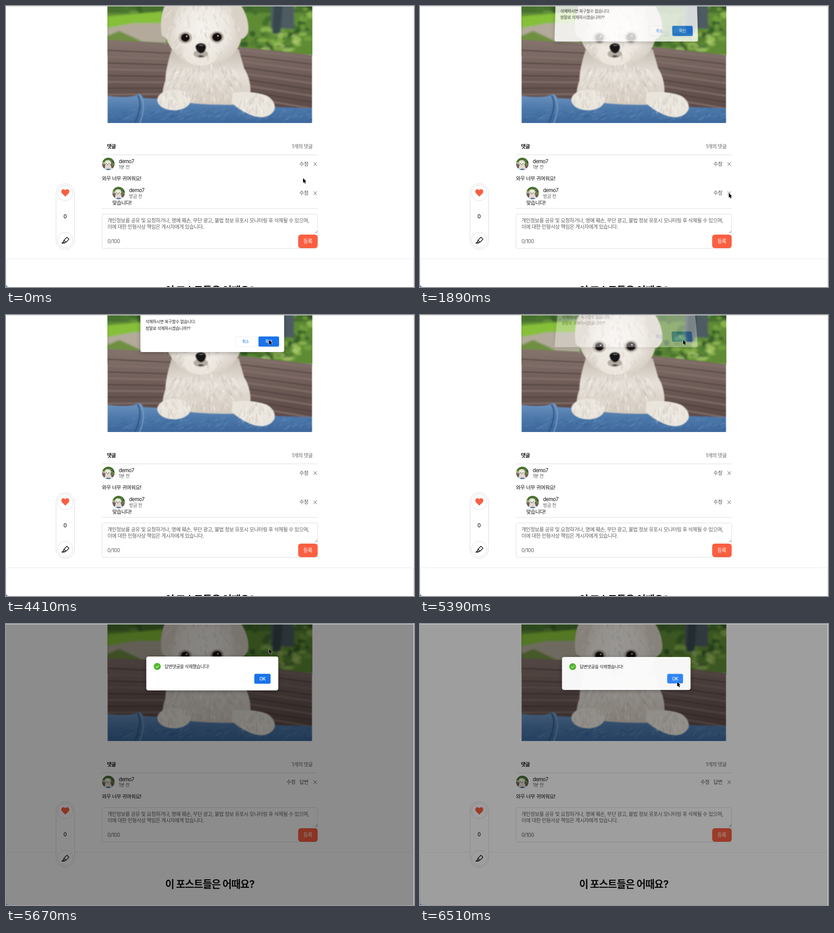
These frames come from a looping animation (901 px wide and 622 px high, 6.58 s). An HTML page:

```html
<!DOCTYPE html>
<html lang="ko">
<head>
<meta charset="utf-8">
<title>댓글 삭제</title>
<style>
  html, body { margin: 0; width: 100%; height: 100%; overflow: hidden; background: #fff; }
  #stage { position: absolute; inset: 0; overflow: hidden; contain: strict; }
  svg { position: absolute; left: 0; top: 0; width: 901px; height: 622px; }
  text { font-family: Inter, "Noto Sans CJK KR", "Noto Sans CJK", sans-serif; letter-spacing: -.04em; white-space: pre; }
  #confirm { height: 100px; transform-origin: 455.5px 82px; overflow: visible; }
  #confirmBox, #alert { filter: drop-shadow(0 2px 5px rgba(0, 0, 0, .3)); }
</style>
</head>
<body>
<div id="stage">
<svg id="page" viewBox="0 0 901 622"></svg>
<svg id="confirm" viewBox="0 0 901 100"></svg>
<svg id="top" viewBox="0 0 901 622"></svg>
</div>
<script>
const LOOP = 6580;
const ORANGE = '#fa5f42', BLUE = '#1a73e8', LINE = '#dcdcdc';
const NAME = 'demo7';
const $ = id => document.getElementById(id);

let seed = 11;
const rnd = () => (seed = (seed * 16807) % 2147483647) / 2147483647;
const span = (a, b) => +(a + (b - a) * rnd()).toFixed(1);
const repeat = (n, fn) => Array.from({ length: n }, (_, i) => fn(i)).join('');

const text = (x, y, size, fill, str, extra = '') =>
  `<text x="${x}" y="${y}" font-size="${size}" fill="${fill}" ${extra}>${str}</text>`;
const rect = (x, y, w, h, r, fill, extra = '') =>
  `<rect x="${x}" y="${y}" width="${w}" height="${h}" rx="${r}" fill="${fill}" ${extra}/>`;
const oval = (x, y, rx, ry, fill, extra = '') =>
  `<ellipse cx="${x}" cy="${y}" rx="${rx}" ry="${ry}" fill="${fill}" ${extra}/>`;
const path = (d, fill, extra = '') => `<path d="${d}" fill="${fill}" ${extra}/>`;
const stroke = (color, w = 1) => `stroke="${color}" stroke-width="${w}"`;
const blurred = (id, content) => `<g filter="url(#${id})">${content}</g>`;
const BOLD = 'font-weight="700"', MEDIUM = 'font-weight="500"', MID = 'text-anchor="middle"';

function leaves(n, x0, x1, y0, y1, colors) {
  return repeat(n, i => oval(span(x0, x1), span(y0, y1), span(5, 13), span(3, 8), colors[i % colors.length], 'opacity=".7"'));
}

function fur(n, cx, cy, rx, ry) {
  return repeat(n, i => {
    const a = span(0, 6.283), r = Math.sqrt(rnd());
    const x = cx + Math.cos(a) * r * rx, y = cy + Math.sin(a) * r * ry;
    const dx = (x - cx) * .06 + span(-2, 2);
    return path(`M${x.toFixed(1)} ${y.toFixed(1)}q${dx.toFixed(1)} 4 ${(dx * 1.6).toFixed(1)} ${span(7, 12)}`,
      'none', stroke(i % 2 ? '#fffdf9' : '#bdb4a9', 1.5) + ' opacity=".5"');
  });
}

function photo() {
  const scenery =
    rect(200, -130, 500, 240, 0, '#5f8b36') +
    rect(200, -130, 500, 145, 0, '#47702d') +
    leaves(50, 224, 350, -110, 18, ['#2f5726', '#6f9d42', '#4c7a30']) +
    path('M224 23 L345 12 V40 L224 50Z', '#86c038') +
    path('M224 49 L282 38 H352 V82 L224 76Z', '#b3aa9b') +
    path('M224 66 L250 55 L300 78 L224 84Z', '#6f8f42') +
    leaves(100, 515, 676, -110, 98, ['#284d25', '#79a93f', '#3a652a', '#9dc45a']) +
    rect(585, -120, 51, 170, 0, '#4e5b62') +
    path('M600 -120 H620 L606 62 H588Z', '#39464d') +
    leaves(22, 540, 676, 58, 98, ['#8db84a', '#4d7a30', '#b0cd70']);
  const deck =
    path('M224 75 L350 82 L530 92 L676 109 V259 H224Z', 'url(#wood)') +
    repeat(9, i => path(`M224 ${84 + i * 14} L350 ${91 + i * 13} L530 ${98 + i * 13} L676 ${115 + i * 14}`,
      'none', stroke(i % 2 ? '#453836' : '#84716b', i % 2 ? 2.2 : 4) + ' opacity=".75"'));
  const jeans =
    path('M224 199 Q262 204 285 199 Q296 189 303 204 Q370 207 440 211 Q540 214 600 224 L676 226 V262 H224Z', 'url(#denim)') +
    repeat(150, i => path(`M${span(226, 672)} ${span(230, 256)}l${span(5, 14)} -5`, 'none',
      stroke(i % 2 ? '#86a9d0' : '#2c5287', 1.4) + ' opacity=".35"')) +
    path('M290 197 Q304 218 284 260', 'none', stroke('#2d5482', 3)) +
    path('M297 198 Q311 220 295 260', 'none', stroke('#7ba0c9', 2));
  const dog =
    path('M366 96 Q352 140 352 165 Q344 186 346 206 Q430 222 520 218 L540 190 Q540 160 526 138 L514 96Z', 'url(#coat)') +
    path('M440 -42 C362 -46 344 -8 348 46 C353 92 386 130 432 136 C486 134 520 100 521 60 C532 0 508 -40 440 -42Z', 'url(#head)') +
    path('M372 -22 C347 -14 338 28 344 64 Q355 78 364 64 C371 40 372 10 388 -10Z', '#d9d1c6') +
    path('M496 -22 C526 -6 540 38 534 60 Q523 80 512 70 C502 42 508 10 488 -8Z', '#d9d1c6') +
    oval(430, 106, 38, 26, '#eee9e2', 'opacity=".8"') +
    fur(130, 432, 42, 80, 78) + fur(170, 440, 165, 80, 42) +
    oval(371, 208, 37, 23, '#e9e4dc') +
    path('M500 192 Q540 186 575 198 Q597 210 593 230 Q580 252 548 244 Q520 235 498 214Z', '#e9e4dc') +
    fur(45, 371, 203, 33, 18) + fur(55, 550, 213, 38, 20);
  const face =
    oval(396, 70, 15, 13, '#94877c', 'opacity=".55"') + oval(466, 69, 15, 13, '#94877c', 'opacity=".55"') +
    oval(430, 106, 16, 9, '#877b73', 'opacity=".55"') +
    oval(396, 70, 10, 9.5, '#16110f') + oval(466, 69, 11, 10, '#16110f') +
    path('M418 89 Q422 82 431 82 Q442 83 442 92 Q440 104 430 105 Q419 101 418 89Z', '#181313') +
    path('M423 111 Q430 107 438 111 Q430 116 423 111Z', '#4d423e');
  const shine = oval(399, 67, 2, 2, '#aaa') + oval(468, 66, 2, 2, '#aaa') + oval(431, 87, 5, 2, '#56504f');
  return `<g id="photo">${blurred('soft', scenery)}${blurred('fluff', deck + jeans)}${blurred('fluff', dog + face)}${shine}</g>`;
}

const avatar = (x, y) =>
  `<g transform="translate(${x} ${y})" clip-path="url(#round)"><g transform="translate(0 14) scale(.075) translate(-450 -259)"><use href="#photo"/></g></g>`;

const cross = (x, y) => path(`M${x - 3.6} ${y - 4}l7.2 8m0 -8l-7.2 8`, 'none', stroke('#555', 1));
const action = (x, y, str) => text(x, y, 11.2, '#4c4c4c', str);

function comment(x, y, when) {
  return avatar(x + 14, y) + text(x + 37, y - 2, 11.2, '#111', NAME) + text(x + 37, y + 10.5, 10, '#5c5c5c', when);
}

const form =
  rect(212, 460.5, 476, 76, 4, '#fff', stroke(LINE)) +
  text(224, 479, 11.2, '#5e5e5e', '개인정보를 공유 및 요청하거나, 명예 훼손, 무단 광고, 불법 정보 유포시 모니터링 후 삭제될 수 있으며,') +
  text(224, 492.5, 11.2, '#5e5e5e', '이에 대한 민형사상 책임은 게시자에게 있습니다.') +
  path('M682 503l5.5 -5.5M685 503l2.5 -2.5', 'none', stroke('#777', .9)) +
  text(224, 524.5, 11.2, '#5c5c5c', '0/100') +
  rect(645.2, 506, 43, 30, 6, ORANGE) +
  text(666.5, 525, 11.2, '#fff', '등록', MID + ' ' + MEDIUM);

const sidebar =
  rect(110.5, 393.5, 41, 145, 20.5, '#fff', stroke(LINE)) +
  oval(130.8, 414, 17, 17, '#fff', stroke(LINE)) +
  path('M131 422L123.8 414.8C119 409 126 401.8 131 407.8C136 401.8 143 409 138.2 414.8Z', ORANGE) +
  text(130.5, 470, 11.2, '#111', '0', MID + ' ' + MEDIUM) +
  oval(130.8, 518, 17, 17, '#fff', stroke(LINE)) +
  path('M128 518.5L134.6 511.8L139 516.3L132.6 522.8ZM128 518.5L126.8 522L129 524.3L132.6 522.8M126.8 522L123.2 525H128.4L129 524.3',
    'none', stroke('#111', 1.5) + ' stroke-linejoin="round"');

$('page').innerHTML = `<defs>
  <linearGradient id="denim" x2="0" y2="1"><stop stop-color="#6d93bf"/><stop offset=".5" stop-color="#4b77a9"/><stop offset="1" stop-color="#3d679b"/></linearGradient>
  <linearGradient id="wood" x2="0" y2="1"><stop stop-color="#85736e"/><stop offset=".6" stop-color="#65534f"/><stop offset="1" stop-color="#564543"/></linearGradient>
  <linearGradient id="coat" x2="0" y2="1"><stop stop-color="#c6beb4"/><stop offset=".45" stop-color="#e6e0d8"/><stop offset="1" stop-color="#d3cabf"/></linearGradient>
  <radialGradient id="head" cy=".52"><stop stop-color="#f6f3ee"/><stop offset=".6" stop-color="#ece7e0"/><stop offset="1" stop-color="#d6cec3"/></radialGradient>
  <filter id="soft"><feGaussianBlur stdDeviation="2.2"/></filter>
  <filter id="fluff"><feGaussianBlur stdDeviation=".8"/></filter>
  <clipPath id="frame"><rect x="224" y="0" width="452.5" height="259"/></clipPath>
  <clipPath id="round"><circle r="13.8"/></clipPath></defs>` +
  rect(0, 0, 901, 622, 0, '#fff') +
  `<g clip-path="url(#frame)">${photo()}</g>` +
  text(223, 315, 11.2, '#111', '댓글', BOLD) +
  text(677, 315, 11.2, '#999', '1개의 댓글', BOLD + ' text-anchor="end"') +
  path('M211.5 329.5H688.5', 'none', stroke(LINE)) +
  comment(212, 349.5, '1분 전') + action(648, 353.5, '<tspan id="first"></tspan>') + cross(682.8, 350) +
  `<g id="edit">${action(619.5, 353.5, '수정')}</g>` +
  text(212, 386, 11.2, '#111', '와우 너무 귀여워요!', MEDIUM) +
  `<g id="reply">${comment(234.7, 414, '방금 전')}${action(648, 418, '수정')}${cross(682.8, 414.5)}` +
  text(234.7, 439.5, 11.2, '#111', '맞습니다!', MEDIUM) + path('M211.5 448H688.5', 'none', stroke(LINE)) + '</g>' +
  `<g id="lower">${form}${rect(.5, 559.5, 899.5, 160, 3, '#fff', stroke('#e9e9e9'))}` +
  text(450, 638, 22.3, '#111', '이 포스트들은 어때요?', BOLD + ' ' + MID) + '</g>' + sidebar;

$('confirm').innerHTML =
  `<g id="confirmBox">${rect(296.8, -70, 317.4, 152, 4, '#fff')}` +
  text(308, 18, 9.15, '#222', '삭제하시면 복구할수 없습니다.') +
  text(308, 32.5, 9.15, '#222', '정말로 삭제하시겠습니까??') +
  rect(506.5, 47.5, 45, 22.5, 3, 'none', stroke('#eceef1')) +
  text(529, 62, 8.6, BLUE, '취소', MID + ' ' + MEDIUM) +
  rect(557.5, 47.5, 45.5, 22.5, 3, BLUE) +
  text(580, 62, 8.6, '#fff', '확인', MID + ' ' + MEDIUM) + '</g>';

$('top').innerHTML = `<rect id="shade" width="901" height="622"/>` +
  `<g id="alert">${rect(309.8, 72, 291.5, 75, 4.5, '#fff')}` +
  oval(334, 94, 7.8, 7.8, '#52b92c') +
  path('M330.8 94.2l2.4 2.3l4 -4.6', 'none', stroke('#fff', 1.1)) +
  text(350, 97.5, 9.7, '#222', '답변댓글을 삭제했습니다!') +
  rect(548.3, 110.3, 36, 22, 3.5, BLUE, 'id="ok"') +
  text(566.3, 125, 10, '#fff', 'OK', MID + ' ' + MEDIUM) + '</g>' +
  path('M0 616A6 6 0 0 0 6 622H0Z', '#386f9f') +
  path('M0 .5H901', 'none', stroke('#d2d2d2')) +
  path('M900.5 0V622', 'none', stroke('#e2e2e2')) +
  `<g id="cursor">${path('M0 0V10.4L2.4 8.2L4 12L5.8 11.2L4.2 7.6H7.2Z', '#000', stroke('#fff', 1) + ' paint-order="stroke"')}</g>`;

// time, x, y
const TRACK = [
  [0, 656, 381], [700, 684, 410], [1050, 686, 413], [1260, 686, 413], [1470, 682, 414],
  [1960, 682, 414], [2450, 605, 153], [2520, 596, 136], [2660, 596, 136], [3200, 594, 65],
  [3430, 594, 65], [3850, 581, 55], [5670, 581, 55], [6230, 568, 128], [LOOP, 568, 128]
];
const SWITCH = 5500, SHOW = 5460, HIDE = 6440;

const clamp = v => Math.max(0, Math.min(1, v));
const smooth = u => u * u * (3 - 2 * u);
const show = (id, on) => $(id).setAttribute('display', on ? 'inline' : 'none');

function moveCursor(t) {
  const i = Math.max(1, TRACK.findIndex(k => k[0] > t));
  const [t0, x0, y0] = TRACK[i - 1], [t1, x1, y1] = TRACK[i];
  const u = smooth((t - t0) / (t1 - t0));
  $('cursor').setAttribute('transform', `translate(${x0 + (x1 - x0) * u} ${y0 + (y1 - y0) * u})`);
}

// The sheet fades and tilts back from its lower edge.
function drawConfirm(t) {
  const p = t < 3000 ? clamp((t - 1750) / 180) : clamp((5460 - t) / 210);
  const q = 1 - p, k = .0009 * q;
  const el = $('confirm');
  el.style.display = p > 0 && t >= 1820 ? 'block' : 'none';
  el.style.transform = q ? `matrix3d(1,0,0,0, 0,${1 + 60 * k},0,${-k}, 0,0,1,0, 0,${-16 * q},0,1)` : 'none';
  $('confirmBox').style.opacity = p;
}

function drawAlert(t) {
  const open = 1 - Math.pow(1 - clamp((t - SHOW) / 210), 1.7);
  const close = clamp((t - HIDE) / 70);
  $('shade').setAttribute('opacity', .45 * open - .07 * close);
  const scale = .73 + .27 * open - .026 * close;
  $('alert').setAttribute('transform', `translate(455.5 ${111 - 1.5 * open}) scale(${scale}) translate(-455.5 -109.5)`);
  $('alert').style.opacity = clamp(open * 1.8) - .04 * close;
  show('alert', t >= SWITCH);
  const hover = t >= 6160;
  $('ok').setAttribute('fill', hover ? '#2f88fb' : BLUE);
  $('ok').setAttribute('stroke', hover ? '#a9cdfb' : 'none');
}

function drawPage(t) {
  const gone = t >= SWITCH;
  show('reply', !gone);
  show('edit', gone);
  $('first').textContent = gone ? '답변' : '수정';
  $('lower').setAttribute('transform', `translate(0 ${gone ? -54 : 0})`);
}

const start = performance.now();
function tick() {
  const t = (performance.now() - start) % LOOP;
  drawPage(t);
  drawConfirm(t);
  drawAlert(t);
  moveCursor(t);
  requestAnimationFrame(tick);
}
tick();
</script>
</body>
</html>
```
